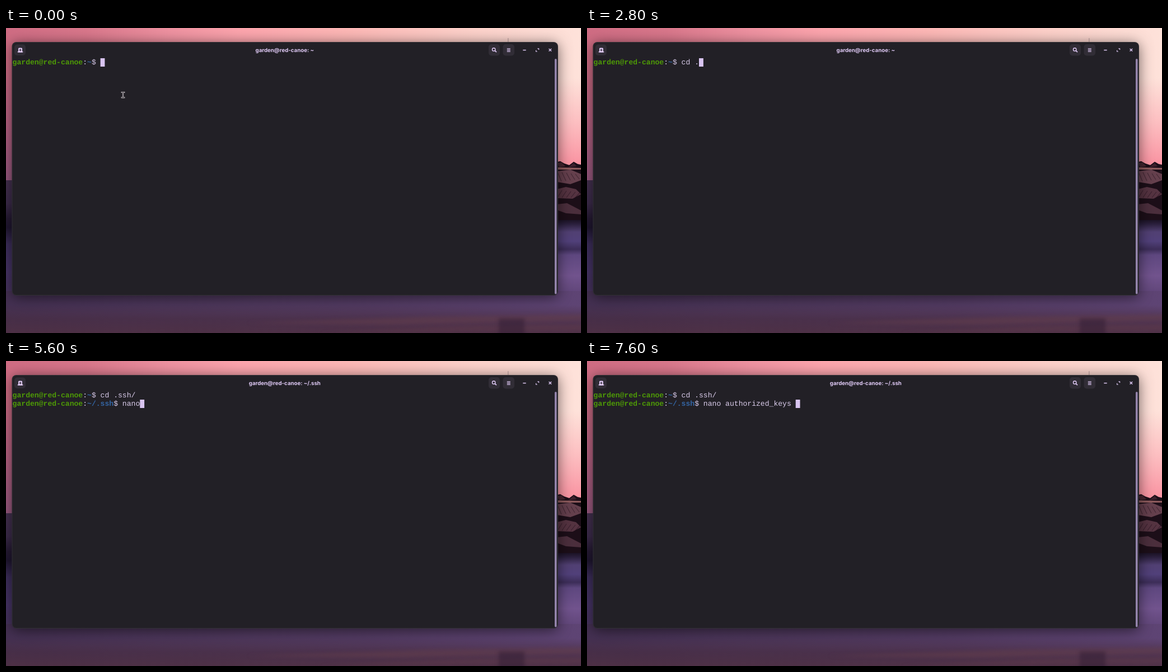
Write an HTML page with a canvas that moves like this. It is 1027 px wide and 545 px high and loops after 8 s.

```html
<!DOCTYPE html>
<html lang="en">
<head>
<meta charset="utf-8">
<title>Terminal</title>
<style>
html, body { margin: 0; width: 100%; height: 100%; overflow: hidden; background: #222026; }
canvas { display: block; }
</style>
</head>
<body>
<canvas id="stage" width="1027" height="545"></canvas>
<script>
const W = 1027, H = 545, LOOP = 8000;
const HOST = 'garden@red-canoe';
const LAVENDER = '#dfc9f5', PANEL = '#222026', BUTTON = '#312d36';
const GREEN = '#4e9a06', BLUE = '#3465a4', TEXT = '#d9cbea';
const LEFT = 11.6, CELL = 7.85, TOP = 54, LINE = 15.1;
const TITLE_AT = 4400, POINTER_UNTIL = 1100;

// time, row, typed text, cursor shown
const steps = [
  [0, 0, '', true],
  [200, 0, '', false],
  [800, 0, '', true],
  [1100, 0, 'c', true],
  [1200, 0, 'cd', true],
  [1300, 0, 'cd ', true],
  [1500, 0, 'cd .', true],
  [1700, 0, 'cd .ss', true],
  [1900, 0, 'cd .ssh', true],
  [2800, 0, 'cd .', true],
  [3200, 0, 'cd .s', true],
  [3300, 0, 'cd .ss', true],
  [3900, 0, 'cd .ssh/', true],
  [4300, 1, '', true],
  [4900, 1, '', false],
  [5200, 1, 'n', true],
  [5300, 1, 'na', true],
  [5400, 1, 'nan', true],
  [5600, 1, 'nano', true],
  [5700, 1, 'nano ', true],
  [5800, 1, 'nano a', true],
  [5900, 1, 'nano au', true],
  [6000, 1, 'nano aut', true],
  [6100, 1, 'nano auto', true],
  [6900, 1, 'nano aut', true],
  [7100, 1, 'nano auth', true],
  [7500, 1, 'nano autho', true],
  [7600, 1, 'nano authorized_keys ', true]
];

const ctx = document.getElementById('stage').getContext('2d');
const backdrop = document.createElement('canvas');
backdrop.width = W;
backdrop.height = H;

function gradient(g, x0, y0, x1, y1, stops) {
  const fill = g.createLinearGradient(x0, y0, x1, y1);
  for (const [at, color] of stops) fill.addColorStop(at, color);
  return fill;
}

function rect(g, x, y, w, h, fill) {
  g.fillStyle = fill;
  g.fillRect(x, y, w, h);
}

function round(g, x, y, w, h, r, fill) {
  g.fillStyle = fill;
  g.beginPath();
  g.roundRect(x, y, w, h, r);
  g.fill();
}

function poly(g, points, fill) {
  g.fillStyle = fill;
  g.beginPath();
  for (const [x, y] of points) g.lineTo(x, y);
  g.fill();
}

function line(g, points, color, width) {
  g.strokeStyle = color;
  g.lineWidth = width;
  g.beginPath();
  points.forEach(([x, y], i) => i ? g.lineTo(x, y) : g.moveTo(x, y));
  g.stroke();
}

function drawSky(g) {
  rect(g, 0, 0, W, 345, gradient(g, 0, 0, W, 0, [
    [0, '#cf6c83'], [0.14, '#d9778b'], [0.28, '#ee91a0'], [0.41, '#fda5ad'],
    [0.6, '#fdb8b6'], [0.8, '#fdd0c9'], [1, '#fee2da']
  ]));
  rect(g, 0, 60, 500, 212, gradient(g, 0, 60, 0, 272, [
    [0, 'rgba(125,75,125,0)'], [0.5, 'rgba(130,75,125,.3)'], [1, 'rgba(115,75,125,.6)']
  ]));
  rect(g, 500, 90, 527, 255, gradient(g, 0, 90, 0, 240, [
    [0, 'rgba(248,130,150,0)'], [0.5, 'rgba(250,130,150,.35)'], [1, 'rgba(248,120,142,.72)']
  ]));
  rect(g, 896.5, 18, 0.8, 8, '#a08488');
}

function drawWater(g) {
  rect(g, 0, 272, 500, 273, gradient(g, 0, 272, 0, H, [
    [0, '#44304f'], [0.15, '#3c2b4b'], [0.25, '#251a33'], [0.31, '#1f1630'],
    [0.42, '#3d2e5c'], [0.6, '#473467'], [0.78, '#463259'], [1, '#4b3149']
  ]));
  rect(g, 500, 340, 527, 205, gradient(g, 0, 340, 0, H, [
    [0, '#150d1b'], [0.05, '#2a1f3c'], [0.12, '#514073'], [0.2, '#51407a'],
    [0.27, '#3c2d58'], [0.32, '#5e477f'], [0.5, '#71538d'], [0.68, '#5d4375'],
    [0.8, '#4d365c'], [0.88, '#50364d'], [1, '#4d3247']
  ]));
  rect(g, 0, 470, W, 75, gradient(g, 0, 0, W, 0, [
    [0, 'rgba(68,48,82,1)'], [0.3, 'rgba(76,54,90,1)'], [0.65, 'rgba(83,59,99,1)'], [1, 'rgba(94,68,116,1)']
  ]));
  rect(g, 0, 470, W, 75, gradient(g, 0, 495, 0, H, [
    [0, 'rgba(76,47,67,0)'], [0.5, 'rgba(72,45,66,.65)'], [1, 'rgba(78,48,68,.9)']
  ]));

  g.filter = 'blur(3px)';
  poly(g, [[430, 527], [760, 516], [1040, 512], [1040, 523], [700, 530]], 'rgba(105,65,76,.45)');
  poly(g, [[560, 545], [820, 532], [1040, 530], [1040, 540]], 'rgba(100,60,72,.35)');
  rect(g, 880, 519, 46, 34, 'rgba(48,29,50,.5)');
  g.filter = 'none';
}

function drawRocks(g) {
  poly(g, [[980, 240], [990, 238], [997, 242], [1006, 245], [1014, 239],
    [1021, 243], [1030, 245], [1030, 343], [980, 343]], '#1c0e18');
  poly(g, [[985, 241], [992, 240], [999, 247], [988, 249]], '#442630');
  poly(g, [[1004, 249], [1014, 241], [1019, 247]], '#3c202c');
  poly(g, [[984, 249], [1030, 250], [1030, 253], [984, 253]], '#8d5a5c');
  poly(g, [[984, 256], [1008, 253], [1027, 261], [1027, 272], [1008, 279], [984, 275]], '#65404d');
  poly(g, [[984, 288], [1000, 284], [1018, 288], [1027, 297], [1012, 305], [984, 304]], '#553341');
  poly(g, [[984, 315], [1002, 313], [1027, 326], [1027, 333], [1000, 331], [984, 325]], '#4b2e3c');
  for (let i = 0; i < 5; i++) {
    line(g, [[985 + i * 8, 257 + i], [992 + i * 8, 274 - i]], 'rgba(28,12,24,.45)', 1.2);
    line(g, [[985 + i * 8, 303], [993 + i * 8, 290 + i]], 'rgba(28,12,24,.45)', 1.2);
  }
}

function drawIcons(g) {
  round(g, 15, 29.5, 20, 19.5, 5, BUTTON);
  round(g, 862, 29, 20, 20.5, 5, BUTTON);
  round(g, 887.5, 29, 20.5, 20.5, 5, BUTTON);

  // new tab
  round(g, 22, 35.5, 7, 8, [1.5, 1.5, 0, 0], LAVENDER);
  rect(g, 20.7, 41.8, 9.6, 1.7, LAVENDER);
  rect(g, 23.4, 38.8, 4.2, 1.2, BUTTON);
  rect(g, 24.9, 37.3, 1.2, 4.2, BUTTON);

  // search
  g.strokeStyle = LAVENDER;
  g.lineWidth = 1.4;
  g.beginPath();
  g.arc(871.2, 38.4, 2.7, 0, Math.PI * 2);
  g.stroke();
  line(g, [[873.2, 40.4], [876, 43.2]], LAVENDER, 1.7);

  // menu and window controls
  for (let i = 0; i < 3; i++) rect(g, 894.8, 36.4 + i * 2.5, 6, 1.3, LAVENDER);
  rect(g, 923.3, 38.8, 5.4, 1.5, LAVENDER);
  line(g, [[949.3, 36.8], [951.6, 36.8], [951.6, 39.1]], LAVENDER, 1.2);
  line(g, [[946.6, 39.7], [946.6, 42], [948.9, 42]], LAVENDER, 1.2);
  line(g, [[969.6, 37], [974.2, 41.6]], LAVENDER, 1.4);
  line(g, [[974.2, 37], [969.6, 41.6]], LAVENDER, 1.4);
}

function drawBackdrop(g) {
  drawSky(g);
  drawWater(g);
  drawRocks(g);
  g.save();
  g.shadowColor = 'rgba(0,0,0,.55)';
  g.shadowBlur = 24;
  g.shadowOffsetY = 3;
  round(g, 10.5, 25, 975.5, 453, 8, PANEL);
  g.restore();
  g.strokeStyle = 'rgba(255,255,255,.07)';
  g.lineWidth = 1;
  g.beginPath();
  g.roundRect(11, 25.5, 974.5, 452, 7.5);
  g.stroke();
  round(g, 980, 55, 3.6, 420.5, 1.8, '#9585ad');
  drawIcons(g);
}

function write(text, col, row, color, bold) {
  ctx.font = (bold ? 'bold ' : '') + '13.08px "Liberation Mono", monospace';
  ctx.fillStyle = color;
  ctx.fillText(text, LEFT + col * CELL, TOP + 11 + row * LINE);
}

function drawLine(row, path, typed) {
  const end = HOST.length + 1 + path.length;
  write(HOST, 0, row, GREEN, true);
  write(':', HOST.length, row, TEXT);
  write(path, HOST.length + 1, row, BLUE, true);
  write('$ ' + typed, end, row, TEXT);
  return end + 2 + typed.length;
}

function drawPointer(x, y) {
  const beam = (color, width) => {
    line(ctx, [[x, y - 4.5], [x, y + 4.5]], color, width);
    for (const dy of [-4.7, 4.7]) line(ctx, [[x - 2.2, y + dy], [x + 2.2, y + dy]], color, width);
  };
  ctx.lineCap = 'square';
  beam('#d9d2d6', 2.2);
  beam('#222026', 0.8);
  ctx.lineCap = 'butt';
}

function draw(time) {
  const [, row, typed, cursor] = steps.findLast(step => step[0] <= time);
  ctx.drawImage(backdrop, 0, 0);

  ctx.font = 'bold 9.7px Inter, sans-serif';
  ctx.fillStyle = LAVENDER;
  ctx.textAlign = 'center';
  ctx.fillText(HOST + ': ~' + (time >= TITLE_AT ? '/.ssh' : ''), 497.8, 43);
  ctx.textAlign = 'left';

  let col = drawLine(0, '~', row ? 'cd .ssh/' : typed);
  if (row) col = drawLine(1, '~/.ssh', typed);
  if (cursor) rect(ctx, LEFT + col * CELL, TOP + row * 15, CELL, 15, '#d9c4f1');
  if (time < POINTER_UNTIL) drawPointer(209, 119.6);
}

function tick() {
  draw(performance.now() % LOOP);
  requestAnimationFrame(tick);
}

ctx.textRendering = 'geometricPrecision';
drawBackdrop(backdrop.getContext('2d'));
tick();
</script>
</body>
</html>
```
